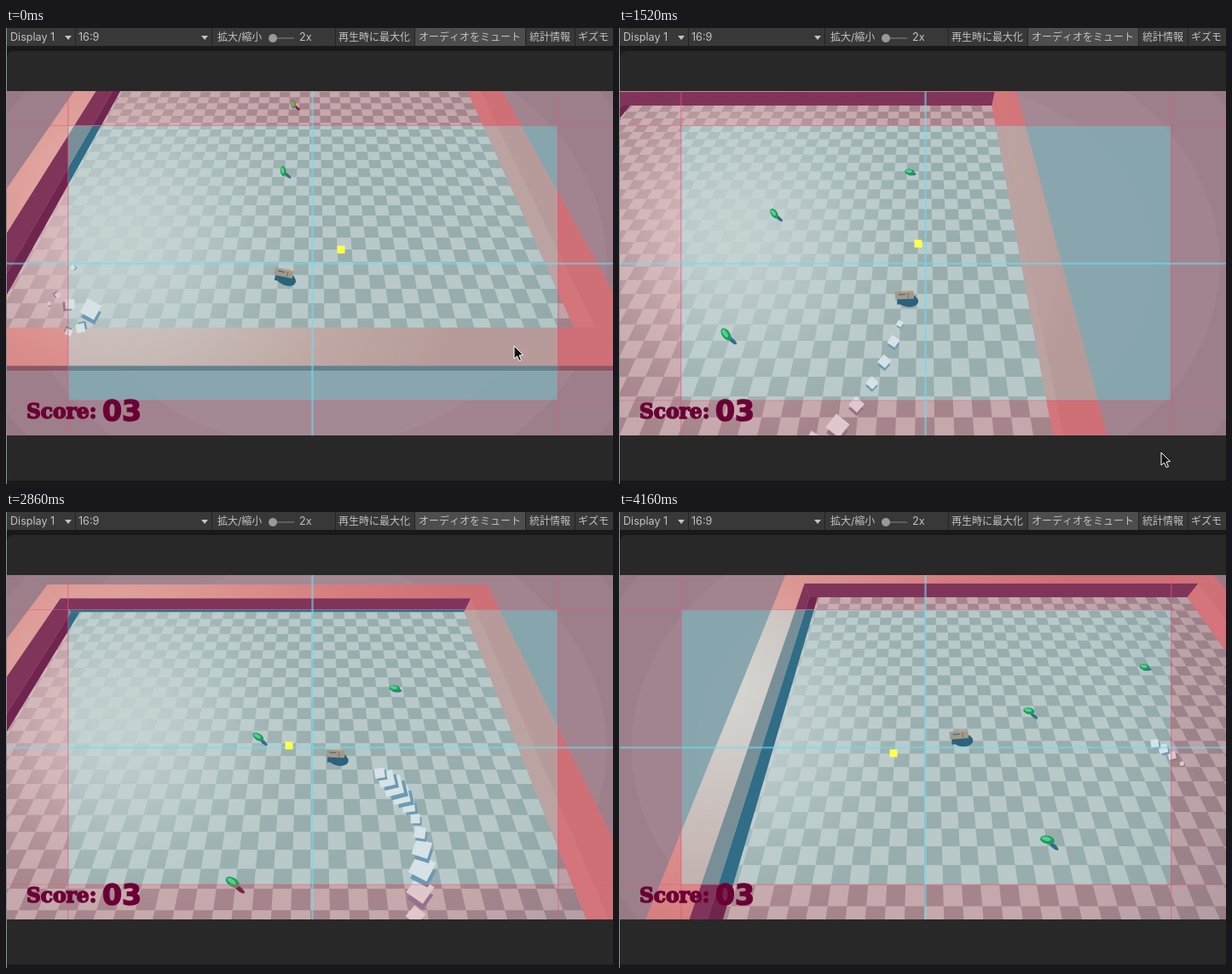
An HTML page with a canvas that plays this animation: 712 by 535 pixels, repeating every 4.26 s.

```html
<!DOCTYPE html>
<html lang="ja">
<meta charset="utf-8">
<style>
html, body { margin: 0; width: 100%; height: 100%; overflow: hidden; background: #191919 }
canvas { display: block }
</style>
<canvas id="stage" width="712" height="535"></canvas>
<script>
const g = document.getElementById('stage').getContext('2d');
const LOOP = 4260, MX = 359.5, MY = 276, F = 350;
const C = .5, S = Math.sqrt(3) / 2;              // camera pitched down 60 degrees
const W = 1.03, BACK = 0, FRONT = -2.06, TH = .117, WALL = .077, CELLS = 36;

// time, camera x z, player x y angle, look point x y
const KEYS = [
  [0, .13, -2.357, 326, 291, .2, 393, 260],
  [720, .52, -2.055, 314, 299, 1.3, 387, 248],
  [1520, .66, -1.592, 336, 317, -.05, 351, 253],
  [2150, .515, -1.434, 367, 302, -.15, 340, 270],
  [2860, .235, -1.397, 387, 287, .05, 332, 274],
  [3670, -.168, -1.42, 402, 276, -.1, 340, 291],
  [4160, -.397, -1.522, 400, 265, -.08, 322, 283]
];
const CURSOR = [[0, 596, 373], [540, 606, 460], [720, 612, 488], [1070, 623, 497], [1520, 636, 498], [2150, 648, 513]];
const CAPSULES = [[.587, -.54, 0], [.025, -.785, 1], [-.005, -1.3, 1]];
const DEBRIS = [[100, 332, 22], [74, 325, 13], [60, 313, 7], [73, 356, 9], [88, 351, 12], [79, 281, 6], [51, 324, 5]];

const OUTER = {
  void: ['#a68a95', '#987a87'], light: '#c5a8ab', dark: '#a5858b', glow: '225,198,200',
  top: ['#e4b5ae', '#dc9692', '#d67d7f', '#cf6f76'], side: '#d4757b', face: '#80345a', shadow: '#70254f', base: '#8b5668',
  cap: '#718352', capLit: '#8fa56c', cube: '#dfc8cb', cubeSide: '#96708c', car: '#a08378', under: '#6b3a5b'
};
const INNER = {
  void: ['#8ba8af', '#7e9fa8'], light: '#b9c9c9', dark: '#98adad', glow: '200,213,213',
  top: ['#d5d6d2', '#cabfbc', '#bfa9a5', '#b79b9a'], side: '#bba3a1', face: '#788f98', shadow: '#316d87', base: '#64818d',
  cap: '#1f9a60', capLit: '#4fd487', cube: '#d6e3e6', cubeSide: '#6d9ab3', car: '#a19a8b', under: '#2c627b'
};

// smooth curve through rows that begin with a time
function at(rows, t) {
  const last = rows.length - 1;
  let i = 0;
  while (i < last - 1 && t >= rows[i + 1][0]) i++;
  const a = rows[i], b = rows[i + 1], p = rows[i - 1] || a, n = rows[i + 2] || b;
  const d = b[0] - a[0], u = Math.min(1, (t - a[0]) / d);
  return a.map((v, k) => {
    const m0 = (b[k] - p[k]) / (b[0] - p[0]) * d, m1 = (n[k] - v) / (n[0] - a[0]) * d;
    const e = b[k] - v;
    return v + u * m0 + u * u * (3 * e - 2 * m0 - m1) + u * u * u * (m0 + m1 - 2 * e);
  });
}

function state(t) {
  const [, cx, cz, px, py, turn, lx, ly] = at(KEYS, t);
  return { cx, cz, px, py, turn, lx, ly };
}

let cam;
function project(x, z, h = 0) {
  const Z = z - cam.cz, u = 1 - h, depth = C * Z + S * u;
  return [MX + F * (x - cam.cx) / depth, MY - F * (S * Z - C * u) / depth, F / depth];
}
function ground(s, x, y) {
  const r = (MY - y) / F, Z = (C + S * r) / (S - C * r);
  return [s.cx + (x - MX) * (C * Z + S) / F, s.cz + Z];
}

function trace(pts) {
  pts.forEach(([x, y], i) => i ? g.lineTo(x, y) : g.moveTo(x, y));
  g.closePath();
}
function quad(color, ...pts) {
  g.fillStyle = color;
  g.beginPath();
  trace(pts.map(p => project(...p)));
  g.fill();
}
function rect(color, x, y, w, h) {
  g.fillStyle = color;
  g.fillRect(x, y, w, h);
}
function disc(color, x, y, rx, ry = rx, a = 0) {
  g.fillStyle = color;
  g.beginPath();
  g.ellipse(x, y, rx, ry, a, 0, 7);
  g.fill();
}
function radial(x, y, r0, r1, colors) {
  const grad = g.createRadialGradient(x, y, r0, x, y, r1);
  colors.forEach((c, i) => grad.addColorStop(i / (colors.length - 1), c));
  return grad;
}

function floor(p) {
  const step = 2 * W / CELLS;
  quad(p.light, [-W, BACK], [W, BACK], [W, FRONT], [-W, FRONT]);
  g.fillStyle = p.dark;
  g.beginPath();
  for (let j = 0; j < CELLS; j++) {
    for (let i = j % 2; i < CELLS; i += 2) {
      const x = -W + i * step, z = -j * step;
      trace([project(x, z), project(x + step, z), project(x + step, z - step), project(x, z - step)]);
    }
  }
  g.fill();
  g.save();
  g.beginPath();
  trace([[-W, BACK], [W, BACK], [W, FRONT], [-W, FRONT]].map(q => project(...q)));
  g.clip();
  const alphas = [.82, .7, .5, .28, .1, 0];
  rect(radial(135, 245, 20, 240, alphas.map(a => `rgba(${p.glow},${a})`)), 0, 74, 712, 404);
  rect(radial(MX, MY, 230, 430, ['rgba(60,100,120,0)', 'rgba(60,80,110,.16)']), 359, 74, 353, 404);
  g.restore();
}

function walls(p) {
  const X = W + TH, B = BACK + TH, E = FRONT - TH, h = WALL;
  quad(p.shadow, [-W, BACK], [-W + .045, BACK], [-W + .045, FRONT], [-W, FRONT]);
  quad(p.face, [-W, BACK], [-W, FRONT], [-W, FRONT, h], [-W, BACK, h]);
  quad(p === INNER ? p.shadow : p.face, [-W, BACK], [W, BACK], [W, BACK, h], [-W, BACK, h]);
  quad(p.side, [W, BACK], [W, FRONT], [W, FRONT, h], [W, BACK, h]);
  quad(p.base, [-X, E, h], [X, E, h], [X, E], [-X, E]);
  const top = radial(120, 205, 10, 430, p.top);
  quad(top, [-X, B, h], [X, B, h], [W, BACK, h], [-W, BACK, h]);
  quad(top, [-X, B, h], [-W, BACK, h], [-W, FRONT, h], [-X, E, h]);
  quad(top, [X, B, h], [W, BACK, h], [W, FRONT, h], [X, E, h]);
  quad(top, [-W, FRONT, h], [W, FRONT, h], [X, E, h], [-X, E, h]);
}

function cube(p, x, y, size, a) {
  g.save();
  g.translate(x, y);
  g.rotate(a);
  rect(p.cubeSide, -size * .3, -size * .2, size * .8, size * .75);
  rect(p.cube, -size * .5, -size * .5, size * .85, size * .85);
  g.restore();
}

function trail(p, t) {
  if (t < 700) DEBRIS.forEach(([x, y, s], i) => {
    const [wx, wz] = ground(state(0), x, y), [sx, sy] = project(wx, wz);
    cube(p, sx, sy, s * (1 - t / 700), .5 + i);
  });
  for (let i = 0; i < 17; i++) {
    const born = 380 + i * 120, age = t - born;
    if (age <= 60 || age > 2400) continue;
    const s = state(born), [x, z] = ground(s, s.px, s.py);
    const jitter = Math.sin(i * 12.9), [sx, sy, k] = project(x + jitter * .03, z - .02, .02);
    const grow = Math.min(1, age / 600, (2400 - age) / 700);
    cube(p, sx, sy, k * grow * (.056 + .02 * Math.sin(i * 7.3)), .25 + jitter * .5);
  }
}

function capsules(p, t) {
  for (const [x, z, spin] of CAPSULES) {
    const [sx, sy, k] = project(x, z, .02), m = k / 300;
    const a = spin ? 1.4 - 1.2 * t / 4160 : .12;
    disc(p.shadow, sx + (spin ? 6 : 3) * m, sy + (spin ? 6 : 3) * m, 6 * m, 2 * m, spin * .7);
    disc(p.cap, sx, sy, 7 * m, 4 * m, a);
    disc(p.capLit, sx - m, sy - m, 4.5 * m, 2 * m, a);
  }
}

function player(p) {
  g.save();
  g.translate(cam.px, cam.py);
  g.rotate(cam.turn);
  disc(p.under, 3, 3, 12, 7.5, .15);
  rect(p.under, -10, -2, 22, 9);
  rect(p.car, -12, -8, 22, 9);
  rect(p.under, -8, -5, 8, 1);
  rect('rgba(205,165,125,.7)', -2, -9, 10, 2);
  rect('rgba(60,65,65,.5)', 3, -6, 1, 6);
  g.restore();
}

function scene(p, t, x, y, w, h) {
  g.save();
  g.beginPath();
  g.rect(x, y, w, h);
  g.clip();
  rect(p.void[1], x, y, w, h);
  [420, 345, 270].forEach((r, i) => {
    g.globalAlpha = .25 + .2 * i;
    disc(p.void[0], MX, MY, r, r * .8);
  });
  g.globalAlpha = 1;
  floor(p);
  walls(p);
  trail(p, t);
  capsules(p, t);
  player(p);
  g.restore();
}

function guides() {
  const pink = 'rgba(226,88,128,.5)', cyan = 'rgba(112,220,238,.6)';
  rect(pink, 72, 74, 1.5, 404);
  rect(pink, 647, 74, 1.5, 404);
  rect(pink, 1, 114, 711, 1);
  rect(pink, 1, 436.5, 711, 1);
  rect(cyan, 358.3, 74, 2.4, 404);
  rect(cyan, 1, 275.3, 711, 2.2);
  rect('#ffff4d', cam.lx - 4.5, cam.ly - 4.5, 9, 9);
}

function score() {
  g.fillStyle = g.strokeStyle = '#6b0035';
  g.lineWidth = 1.5;
  for (const [text, x, y, font] of [
    ['Score:', 24, 458, 'bold 23.3px "DejaVu Serif", serif'],
    ['03', 113, 461, 'bold 33px "DejaVu Sans", sans-serif']
  ]) {
    g.font = font;
    g.fillText(text, x, y);
    g.strokeText(text, x, y);
  }
}

function toolbar() {
  rect('#383838', 0, 0, 712, 21);
  rect('#4d4d4d', 480, 0, 129, 21);
  for (const x of [81, 241, 386, 479, 609, 667]) rect('#242424', x, 0, 1, 21);
  g.fillStyle = '#c2c2c2';
  for (const [text, x, size] of [
    ['Display 1', 5, 12.6], ['16:9', 85, 12.6], ['拡大/縮小', 248, 12], ['2x', 344, 12.6], ['再生時に最大化', 390, 12],
    ['オーディオをミュート', 484, 12], ['統計情報', 614, 12], ['ギズモ', 671, 12]
  ]) {
    g.font = `${size}px Inter, "Noto Sans CJK JP", "Noto Sans CJK", sans-serif`;
    g.fillText(text, x, 15);
  }
  g.beginPath();
  for (const x of [73, 233]) trace([[x - 4, 9], [x + 4, 9], [x, 14]]);
  g.fill();
  rect('#5e5e5e', 313, 11, 25, 2);
  disc('#999', 313, 12, 5);
}

function pointer(t) {
  if (t >= 2240) return;
  const [, x, y] = at(CURSOR, t);
  g.beginPath();
  trace([[0, 0], [0, 15], [3.5, 12], [6, 17.5], [8.5, 16.5], [6, 11], [10.5, 10.5]].map(([a, b]) => [x + a, y + b]));
  g.fillStyle = '#111';
  g.fill();
  g.strokeStyle = '#fff';
  g.lineWidth = 1;
  g.stroke();
}

// start of each step of the picture
const starts = Array.from({ length: 48 }, (_, i) => i < 44 ? 10 * Math.round(8.94 * i) : 3840 + 80 * (i - 43));

function draw(now) {
  const clock = now % LOOP, t = starts.filter(s => s <= clock).pop() || 0;
  cam = state(t);
  rect('#191919', 0, 0, 712, 535);
  g.fillStyle = '#282828';
  g.beginPath();
  g.roundRect(1, 27, 719, 504, [8, 0, 0, 0]);
  g.fill();
  toolbar();
  scene(OUTER, t, 1, 74, 711, 404);
  scene(INNER, t, 73, 114.5, 574, 322.5);
  guides();
  score();
  pointer(t);
  rect('#8a9292', 0, 0, 1, 535);
}

const begin = performance.now();
function tick() {
  draw(performance.now() - begin);
  requestAnimationFrame(tick);
}
tick();
</script>
</html>
```
